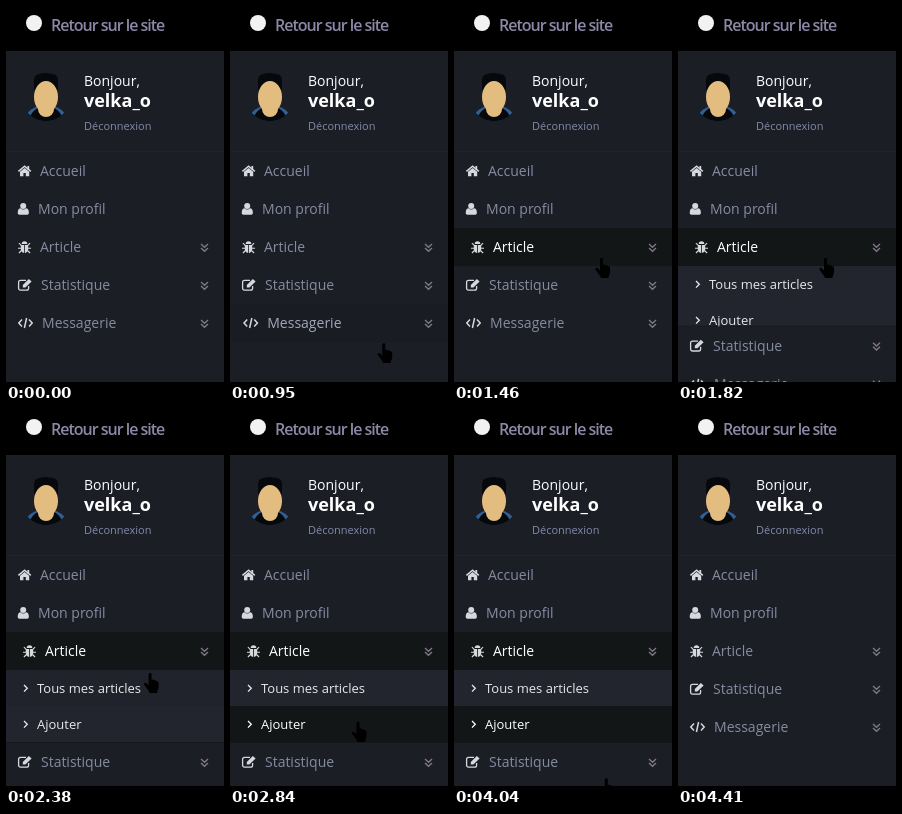
An HTML page with a canvas for the animation above (4980 ms loop, 218 by 376 pixels).

```html
<!DOCTYPE html>
<html lang="fr">
<head>
<meta charset="utf-8">
<title>Menu</title>
<style>
html, body { margin: 0; width: 100%; height: 100%; overflow: hidden; background: #1c1e26; }
canvas { display: block; width: 218px; height: 376px; }
</style>
</head>
<body>
<canvas id="stage"></canvas>
<script>
const W = 218, H = 376, LOOP = 4980, RESET = 4410;
const C = {
  bg: '#1c1e26', sub: '#22252e', hover: '#131617', line: '#14161b', rule: '#20242a',
  text: [134, 140, 160], white: [255, 255, 255], icon: '#d6d9dc',
  arrow: '#81798a', title: '#8c88a6', link: '#828aa8', skin: '#e3bc80', dark: '#07080b'
};
const canvas = document.getElementById('stage');
const ctx = canvas.getContext('2d');
const dpr = window.devicePixelRatio || 1;
canvas.width = W * dpr;
canvas.height = H * dpr;

// Each icon: filled path, stroked path, stroke width
const icons = {
  home: ['M9.4 2h1.8v3.4h-1.8zM2 7.8L6.6 4L11.2 7.8V12.2H7.8V9H5.4V12.2H2z', 'M.4 7.4L6.6 2.2L12.8 7.4', 1.5],
  user: ['M2.2 4a3 3 0 1 1 6 0a3 3 0 1 1-6 0zM-.3 10.8C-.3 7.5 1.1 6.2 2.5 6.2C4 7.8 6.6 7.8 8 6.2C9.6 6.2 10.9 7.5 10.9 10.8C10.9 12 10.2 12.8 9.2 12.8H1.4C.4 12.8-.3 12-.3 10.8z', '', 1],
  bug: ['M3.7 4a2.8 2.8 0 0 1 5.6 0zM2.8 4.9H6.1V13C4.2 12.8 2.8 11 2.8 9zM6.9 4.9H10.2V9C10.2 11 8.8 12.8 6.9 13z',
    'M0 8.2h3M10 8.2h3M.9 3.2l2.6 2.5M12.1 3.2l-2.6 2.5M.9 13l2.6-2.5M12.1 13l-2.6-2.5', 1.15],
  edit: ['M4.8 9.5V7L10.8 1L13.6 3.5L7.4 9.5z',
    'M10.6 8v2.3a1.9 1.9 0 0 1-1.9 1.9H2.5a1.9 1.9 0 0 1-1.9-1.9V4.2A1.9 1.9 0 0 1 2.5 2.3H8', 1.3],
  code: ['', 'M4 3.6L.8 7L4 10.4M11 3.6L14.2 7L11 10.4M8.6 2L6.4 12', 1.5]
};
for (const k in icons) {
  const [fill, stroke, width] = icons[k];
  icons[k] = { fill: new Path2D(fill), stroke: new Path2D(stroke), width };
}
const hand = new Path2D('M5 1.5C5 -.4 8 -.4 8 1.5V7C8.6 6.2 10.4 6.4 10.6 7.6C11.4 7 12.8 7.3 13 8.4C14 8 15 8.6 15 9.8V14C15 16 13.6 17 13.4 20H6C5.6 17.6 3 15.6 .6 11.8C-.2 10.2 1.8 9.2 3 10.4L5 12.4z');
const chevron = new Path2D('M0 0l3.5 3.3l3.5 -3.3M0 4l3.5 3.3l3.5 -3.3');
const angle = new Path2D('M0 0l3.3 3.3l-3.3 3.3');

const rows = [
  { label: 'Accueil', icon: 'home', x: 34 },
  { label: 'Mon profil', icon: 'user', x: 32 },
  { label: 'Article', icon: 'bug', x: 34, arrow: true, on: 1200, off: RESET },
  { label: 'Statistique', icon: 'edit', x: 35, arrow: true, on: 1030, off: 1190 },
  { label: 'Messagerie', icon: 'code', x: 36, arrow: true, on: 930, off: 1025 }
];
const subRows = [
  { label: 'Tous mes articles', on: 2375, off: 2565 },
  { label: 'Ajouter', on: 2570, off: RESET }
];

// time, x, y of the pointer
const track = [
  [850, 150, 372], [1180, 141, 258], [1410, 141, 256], [1460, 141, 252],
  [2320, 141, 252], [2660, 122, 313], [2800, 122, 313], [2840, 121.5, 312],
  [3110, 121.5, 312], [3150, 121, 313.5], [3370, 121, 313.5], [3380, 121, 314],
  [3755, 121, 314], [3780, 125, 320], [3800, 125, 320], [4090, 150, 378]
];

const clamp = v => Math.max(0, Math.min(1, v));
const mix = (a, b, k) => a + (b - a) * k;
const blend = (a, b, k) => `rgb(${a.map((v, i) => Math.round(mix(v, b[i], k)))})`;
const fade = ms => 1 - (1 - clamp(ms / 160)) ** 2;

function hoverAt(row, t) {
  if (!row.on || t >= RESET) return 0;
  return fade(t - row.on) * (1 - fade(t - row.off));
}

function openHeight(t) {
  if (t >= RESET) return 0;
  return 73 * (0.5 - Math.cos(Math.PI * clamp((t - 1660) / 220)) / 2);
}

function rect(x, y, w, h, color) {
  ctx.fillStyle = color;
  ctx.fillRect(x, y, w, h);
}

function text(str, x, y, size, color, weight = 400, spacing = '0px') {
  ctx.font = `${weight} ${size}px "Open Sans", sans-serif`;
  ctx.letterSpacing = spacing;
  ctx.fillStyle = color;
  ctx.fillText(str, x, y);
}

function stroke(path, x, y, color, width) {
  ctx.save();
  ctx.translate(x, y);
  ctx.strokeStyle = color;
  ctx.lineWidth = width;
  ctx.stroke(path);
  ctx.restore();
}

function drawIcon(name, x, y) {
  const { fill, stroke: lines, width } = icons[name];
  ctx.save();
  ctx.translate(x, y);
  ctx.fillStyle = C.icon;
  ctx.fill(fill);
  ctx.restore();
  stroke(lines, x, y, C.icon, width);
}

function highlight(y, h, k) {
  ctx.globalAlpha = k;
  rect(0, y, W, h, C.hover);
  ctx.globalAlpha = 1;
}

function ellipse(x, y, rx, ry, color) {
  ctx.fillStyle = color;
  ctx.beginPath();
  ctx.ellipse(x, y, rx, ry, 0, 0, 7);
  ctx.fill();
}

function drawAvatar() {
  ctx.save();
  ctx.beginPath();
  ctx.arc(40, 91, 24, 0, 7);
  ctx.clip();
  ellipse(40, 114, 21, 15, '#2f5f94');
  ellipse(40, 116, 17, 16, C.dark);
  rect(20, 109, 40, 8, C.dark);
  ellipse(40, 103, 8, 8, C.skin);
  ctx.fillStyle = C.dark;
  ctx.beginPath();
  ctx.roundRect(28, 67, 24, 22, 7);
  ctx.fill();
  ellipse(40, 91, 12, 16, C.skin);
  ctx.restore();
}

function drawHeader() {
  rect(0, 0, W, 45, '#000');
  ellipse(28, 17, 8, 8, '#f2f2f2');
  text('Retour sur le site', 45, 25, 16, C.title, 600, '-1px');
  drawAvatar();
  text('Bonjour,', 78, 80, 14, '#fff');
  text('velka_o', 78, 101, 18, '#fff', 700);
  text('Déconnexion', 78, 124, 11, C.link);
  rect(0, 145, W, 1, C.rule);
}

function drawRow(row, y, t) {
  const k = hoverAt(row, t), dx = 5 * k;
  highlight(y, 38, k);
  drawIcon(row.icon, 12 + dx, y + 12);
  text(row.label, row.x + dx, y + 24, 14, blend(C.text, C.white, k));
  if (row.arrow) stroke(chevron, 195, y + 16, C.arrow, 1.3);
}

function drawSubmenu(h, t) {
  ctx.save();
  ctx.beginPath();
  ctx.rect(0, 260, W, h);
  ctx.clip();
  rect(0, 260, W, 73, C.sub);
  subRows.forEach((row, i) => {
    const y = 260 + 36 * i, k = hoverAt(row, t);
    const color = blend([232, 233, 236], C.white, k);
    highlight(y, 36, k);
    stroke(angle, 18, y + 15, color, 1.3);
    text(row.label, 31, y + 23, 13, color);
  });
  rect(0, 259 + h, W, 1, C.line);
  ctx.restore();
}

function drawPointer(t) {
  const i = track.findIndex(p => p[0] > t);
  if (i < 1) return;
  const [a, b] = [track[i - 1], track[i]];
  const k = (t - a[0]) / (b[0] - a[0]);
  ctx.save();
  ctx.translate(mix(a[1], b[1], k), mix(a[2], b[2], k));
  ctx.fillStyle = '#000';
  ctx.fill(hand);
  ctx.restore();
}

function draw(t) {
  ctx.setTransform(dpr, 0, 0, dpr, 0, 0);
  rect(0, 0, W, H, C.bg);
  drawHeader();
  const open = openHeight(t);
  rows.forEach((row, i) => drawRow(row, 146 + 38 * i + (i > 2 ? open : 0), t));
  if (open > 0) drawSubmenu(open, t);
  drawPointer(t);
}

const start = performance.now();
function tick() {
  draw((performance.now() - start) % LOOP);
  requestAnimationFrame(tick);
}
tick();
</script>
</body>
</html>
```
